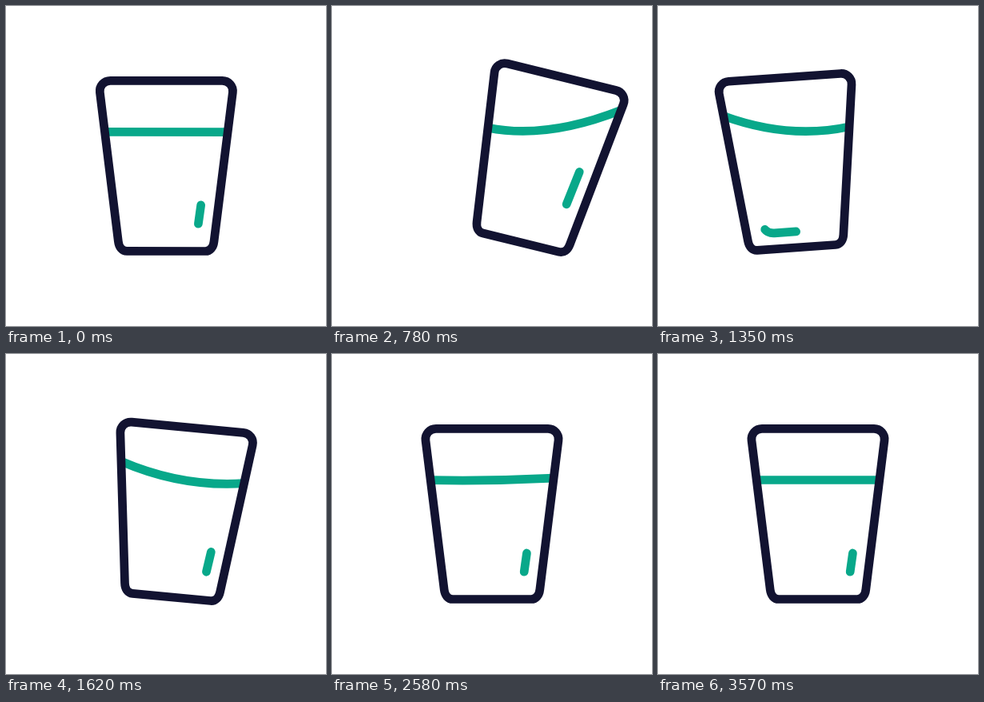
An HTML page for the animation above (5.69 s loop, 400 by 400 pixels).

```html
<!DOCTYPE html>
<html lang="en">
<head>
<meta charset="utf-8">
<title>Swaying glass</title>
<style>
  html, body { margin: 0; width: 100%; height: 100%; overflow: hidden; background: #fff; }
  svg { display: block; width: 100vw; height: 100vh; }
  path { fill: none; stroke-width: 10.7; stroke-linejoin: round; }
  .liquid, .shine { stroke: #08a88a; }
  .shine { stroke-linecap: round; }
  .outline { stroke: #121331; }
</style>
</head>
<body>
<svg viewBox="0 0 400 400">
  <g id="glass">
    <path id="liquid" class="liquid"/>
    <path id="shine" class="shine" d="M251 195L239.8 275Q238.2 286.5 226 286.5H174Q161.8 286.5 160.2 275L149 195"/>
    <path class="outline" d="M130 93.4H270C278 93.4 284 100 283 108L259.8 294.5C259 301.5 255 306.5 249 306.5H151C145 306.5 141 301.5 140.2 294.5L117 108C116 100 122 93.4 130 93.4Z"/>
  </g>
</svg>
<script>
const LOOP = 5690;
const LEVEL = 157.5;

// Turning points of the glass and of the liquid, in ms.
const SWAY = [0, 720, 1240, 1630, 2200];
const SLOSH = [0, 700, 1440, 1900, 3000, 3570];
const SWELL = [0, 800, 3000];

const smooth = u => u * u * (3 - 2 * u);
const easeOut = power => u => 1 - (1 - u) ** power;

// Moves from value to value; the first move may have its own easing.
function move(times, values, t, first = smooth) {
  const next = times.findIndex(time => time > t);
  if (next < 0) return values[values.length - 1];
  const i = next - 1;
  const u = (t - times[i]) / (times[next] - times[i]);
  const ease = i === 0 ? first : smooth;
  return values[i] + (values[next] - values[i]) * ease(u);
}

const glass = document.getElementById("glass");
const liquid = document.getElementById("liquid");
const shine = document.getElementById("shine");
const inset = y => 117 + (y - 107) * 0.124;

function drawGlass(t) {
  const push = easeOut(3);
  const shift = move(SWAY, [0, 66, -47, 17, 0], t, push);
  const angle = move(SWAY, [0, 14.6, -6.3, 5.4, 0], t, push);
  const lift = -0.125 * Math.abs(shift);
  glass.setAttribute("transform", `translate(${shift} ${lift}) rotate(${angle} 200 200)`);
}

function drawLiquid(t) {
  const tilt = move(SLOSH, [0, 32, -14, 8, -2, 0], t);
  const sag = move(SWELL, [0, 11, 0], t);
  const left = LEVEL - sag + tilt, right = LEVEL - sag - tilt;
  liquid.setAttribute("d",
    `M${inset(left)} ${left}Q200 ${LEVEL + 1.5 * sag} ${400 - inset(right)} ${right}`);
}

// The highlight is a dash that slides along the inside of the wall.
function drawShine(t) {
  const slide = easeOut(1.7);
  const start = move(SWAY, [54.5, 3, 144, 51, 54.5], t, slide);
  const length = move(SWAY, [23.5, 43.5, 44, 25.5, 23.5], t, slide);
  shine.setAttribute("stroke-dasharray", `${length} 999`);
  shine.setAttribute("stroke-dashoffset", -start);
}

function draw(t) {
  drawGlass(t);
  drawLiquid(t);
  drawShine(t);
}

const begin = performance.now();
function tick() {
  draw((performance.now() - begin) % LOOP);
  requestAnimationFrame(tick);
}
draw(0);
requestAnimationFrame(tick);
</script>
</body>
</html>
```
